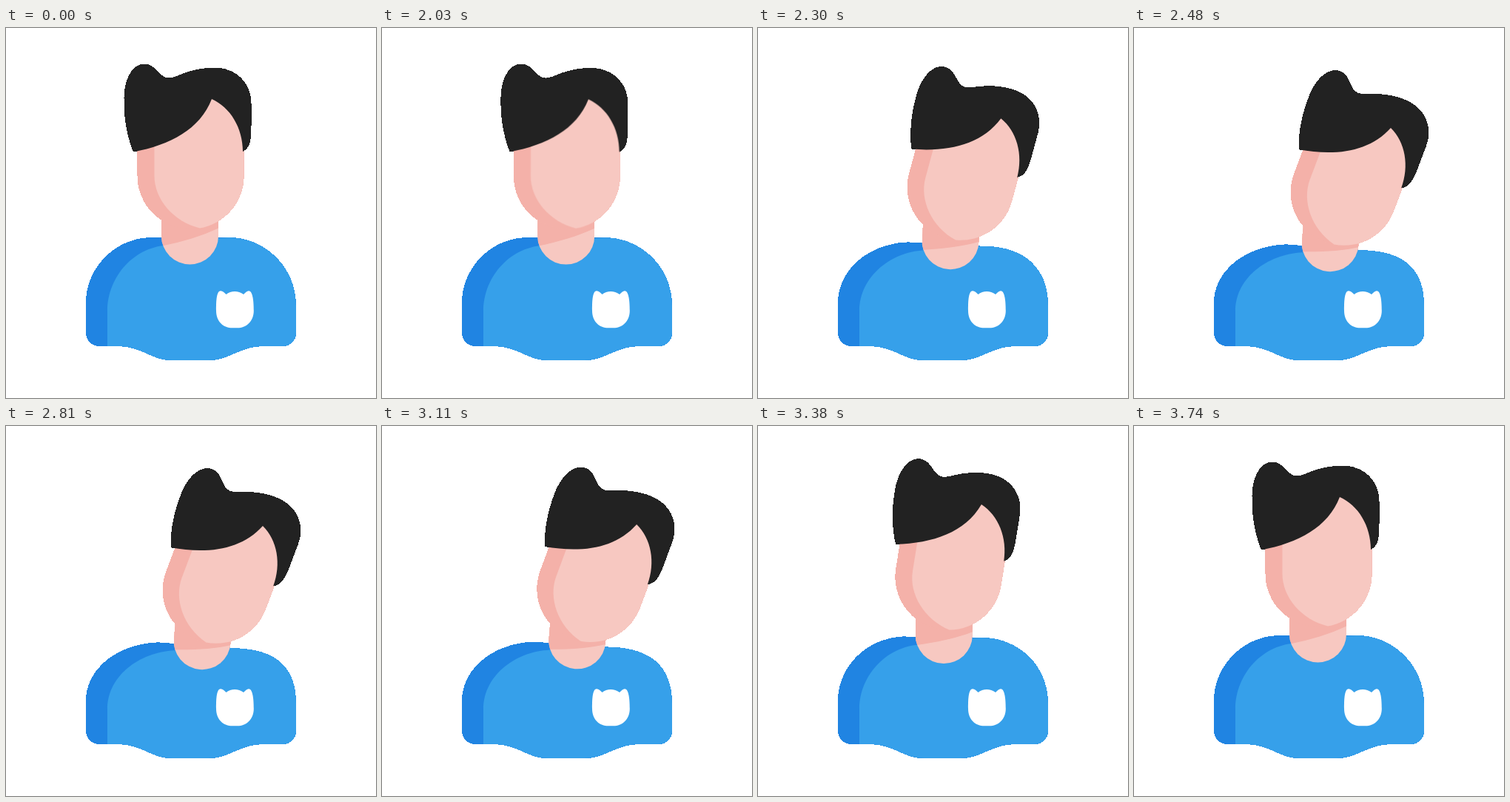
Animation of 500x500 px, one loop 3.77 s. Source, as an HTML page:

```html
<!DOCTYPE html>
<html lang="en">
<head>
<meta charset="utf-8">
<title>Head tilt</title>
<style>
  html, body { margin: 0; width: 100%; height: 100%; overflow: hidden; background: #fff; }
  svg { display: block; width: 100%; height: 100%; }
</style>
</head>
<body>
<svg viewBox="0 0 500 500">
  <defs>
    <path id="neckShape" d="M210 236H287V281A38.5 38.5 0 0 1 210 281Z"/>
    <clipPath id="neckClip"><use href="#neckShape"/></clipPath>
    <!-- Hard outer silhouette, smooth inner edges -->
    <filter id="hardEdge" filterUnits="userSpaceOnUse" x="0" y="0" width="500" height="500" color-interpolation-filters="sRGB">
      <feComponentTransfer><feFuncA type="discrete" tableValues="0 1"/></feComponentTransfer>
    </filter>
  </defs>
  <g filter="url(#hardEdge)">
    <path id="shirtDark" fill="#2084e2"/>
    <path id="shirt" fill="#36a0ea"/>
    <path id="badge" fill="#fff" d="M284 382C284 372 284 355.3 290 355.3C293 355.3 295 358 297.5 360C304 354.5 314 354.5 321 360C323.5 358 325.5 355.3 328 355.3C334 355.3 334.8 372 334.8 382C334.8 397 324 405.3 313 405.3H306C294 405.3 284 397 284 382Z"/>
    <g id="neck">
      <use href="#neckShape" fill="#f7c8c1"/>
      <g clip-path="url(#neckClip)">
        <path id="chinShadow" fill="#f4b1a9" d="M190 190H310V261L287 270.5C265 281 238 289 211 294.5L190 297Z"/>
      </g>
    </g>
    <g id="head">
      <path fill="#f4b1a9" d="M177.5 96H321.5V200A72 71.5 0 0 1 177.5 200Z"/>
      <path fill="#f7c8c1" d="M200.5 96H321.5V200A72 71.5 0 0 1 262 270.4C226 262 200.5 231 200.5 200Z"/>
      <path fill="#222" d="M172 167.5C163 145 159 120 159.5 95C160 68 171 48.5 187 48.5C200 48.5 206 62 214 66C221 69.5 228 66 237 62.5C250 57 266 53.5 281 53.5C311 53.5 331.5 74 331.5 102V132C331.5 152 330 162 320 167C320 135 303 107 278 96C262 137 222 158 172 167.5Z"/>
    </g>
  </g>
</svg>
<script>
  const LOOP = 3770;
  const HEM = 'C185 430 195 449 225 449H273C303 449 315 430 348 430H374A18 18 0 0 0 392 412V375';
  const el = id => document.getElementById(id);
  const [shirtDark, shirt, neck, chinShadow, head] =
    ['shirtDark', 'shirt', 'neck', 'chinShadow', 'head'].map(el);

  const ease = (t, start, length) => {
    const u = Math.min(1, Math.max(0, (t - start) / length));
    return u * u * (3 - 2 * u);
  };

  // The neck leads the way back; the head's rotation follows a little later.
  const leanAt = t => ease(t, 2000, 475) - ease(t, 3027, 478);
  const tiltAt = t => ease(t, 2000, 455) - ease(t, 3065, 585);

  function drawShirt(lean) {
    const leftX = 198 + 10 * lean, leftY = 283 + 9.4 * lean;
    const rightX = 300 + 12 * lean, rightY = 283 + 17.4 * lean;
    const innerX = 222 + 10 * lean, innerY = 293.6 + 9.6 * lean;
    const rightShoulder = `C392 324 ${rightX + 51} ${rightY + 2 * lean} ${rightX} ${rightY}`;
    shirtDark.setAttribute('d',
      `M126 430H150${HEM}${rightShoulder}L${leftX} ${leftY}` +
      `C${leftX - 50} ${leftY} 108 323 108 373V412A18 18 0 0 0 126 430Z`);
    shirt.setAttribute('d',
      `M137 430H150${HEM}${rightShoulder}L${innerX + 20} ${innerY - 6}L${innerX} ${innerY}` +
      `C${innerX - 47} ${innerY} 137 335 137 383Z`);
  }

  function render(t) {
    const lean = leanAt(t), tilt = tiltAt(t);
    drawShirt(lean);
    neck.setAttribute('transform',
      `translate(${13.3 * lean} ${9.5 * lean}) rotate(${5 * lean} 248.5 319.5)`);
    chinShadow.setAttribute('transform',
      `translate(0 ${7 * tilt}) rotate(${8 * tilt} 250 285)`);
    head.setAttribute('transform',
      `translate(${26.5 * lean} ${19.5 * lean}) rotate(${20.7 * tilt} 246 222)`);
  }

  const begin = performance.now();
  function tick() {
    render((performance.now() - begin) % LOOP);
    requestAnimationFrame(tick);
  }
  tick();
</script>
</body>
</html>
```
